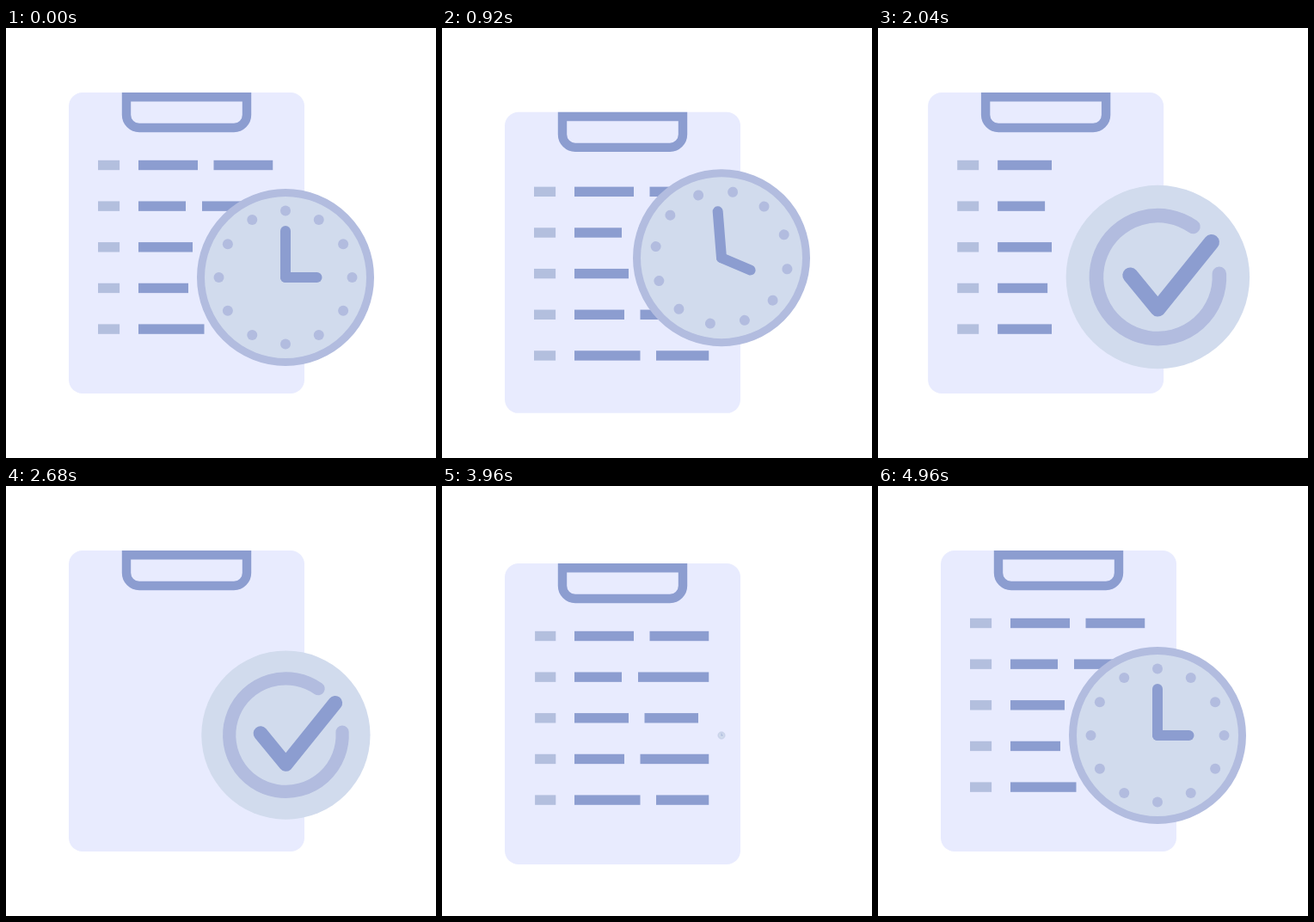
These frames come from a looping animation (500x500 px, 5 s). An HTML page:

```html
<!DOCTYPE html>
<html lang="en">
<head>
<meta charset="utf-8">
<title>Checklist and clock</title>
<style>
html, body { margin: 0; width: 100%; height: 100%; overflow: hidden; background: #fff; }
svg { display: block; width: 100%; height: 100%; }
.line { fill: none; stroke-linecap: round; stroke-linejoin: round; }
</style>
</head>
<body>
<svg viewBox="0 0 500 500">
  <defs>
    <clipPath id="textClip"><rect id="textBox" x="154" y="100" height="300"/></clipPath>
    <clipPath id="markClip"><rect id="markBox" x="107" y="100" height="300"/></clipPath>
  </defs>
  <g id="board">
    <rect x="73" y="75" width="274" height="350" rx="16" fill="#e8ebfe"/>
    <path d="M140 80.2H280V101a15 15 0 0 1-15 15H155a15 15 0 0 1-15-15Z" fill="none" stroke="#8c9dd0" stroke-width="10.4"/>
  </g>
  <g id="rows">
    <g clip-path="url(#markClip)"><g id="marks" fill="#b3bfde"/></g>
    <g clip-path="url(#textClip)"><g id="texts" fill="#8c9dd0"/></g>
  </g>
  <g id="clock">
    <circle r="98.5" fill="#d1dbed" stroke="#b2bcdf" stroke-width="9"/>
    <g id="dots" fill="#b2bcdf"/>
    <g class="line" stroke="#8c9dd0" stroke-width="12">
      <path id="minute" d="M0 0V-54"/>
      <path id="hour" d="M0 0H36.5"/>
    </g>
  </g>
  <g id="badge">
    <circle r="100" fill="#d1dbed"/>
    <path id="arc" class="line" stroke="#b2bcdf" stroke-width="15.5"/>
    <path id="check" class="line" stroke="#8c9dd0" stroke-width="17" d="M-30-2L0 34.5L58.5-38"/>
  </g>
</svg>
<script>
const FRAME = 40, LOOP = 5000;
const NS = "http://www.w3.org/2000/svg";
const $ = id => document.getElementById(id);

function add(parent, tag, attrs) {
  const el = document.createElementNS(NS, tag);
  for (const k in attrs) el.setAttribute(k, attrs[k]);
  parent.appendChild(el);
}

// x ranges of the two bars in each row
const bars = [
  [154, 223, 241.5, 310.5],
  [154, 209, 228, 310.5],
  [154, 217, 235.5, 298],
  [154, 212, 230.5, 310.5],
  [154, 230.5, 249, 310.5]
];
bars.forEach(([a, b, c, d], i) => {
  const y = 153.8 + i * 47.65, height = 11.4;
  add($("marks"), "rect", { x: 107, y, width: 25.3, height });
  add($("texts"), "rect", { x: a, y, width: b - a, height });
  add($("texts"), "rect", { x: c, y, width: d - c, height });
});
for (let i = 0; i < 12; i++) {
  const a = i * Math.PI / 6;
  add($("dots"), "circle", { cx: 77.5 * Math.cos(a), cy: 77.5 * Math.sin(a), r: 6 });
}

// cubic-bezier(.5, 0, .5, 1)
function ease(x) {
  let lo = 0, hi = 1;
  for (let i = 0; i < 24; i++) {
    const t = (lo + hi) / 2;
    if (1.5 * t * (1 - t) + t * t * t < x) lo = t; else hi = t;
  }
  return lo * lo * (3 - 2 * lo);
}

// eased value at time f through [time, value] keys
function track(f, ...keys) {
  if (f <= keys[0][0]) return keys[0][1];
  for (let i = 1; i < keys.length; i++) {
    const [t0, a] = keys[i - 1], [t1, b] = keys[i];
    if (f < t1) return a + (b - a) * ease((f - t0) / (t1 - t0));
  }
  return keys[keys.length - 1][1];
}

const move = (id, x, y, rest = "") =>
  $(id).setAttribute("transform", `translate(${x} ${y})${rest}`);
const spin = (id, a) => $(id).setAttribute("transform", `rotate(${a})`);

function arcPath(r, from, to) {
  const p = a => [r * Math.cos(a * Math.PI / 180), r * Math.sin(a * Math.PI / 180)].join(" ");
  return `M${p(from)}A${r} ${r} 0 ${to - from > 180 ? 1 : 0} 1 ${p(to)}`;
}

const CHECK = $("check").getTotalLength();

function draw(ms) {
  const f = Math.floor((ms % LOOP) / FRAME);

  const swing = track(f, [0, 0], [13, -25], [25, 25], [26, 25], [37, 0]);
  const bounce = track(f, [76, 0], [87, -15], [99, 15], [112, 0]);
  const shift = track(f, [40, 0], [50.5, -15], [57.5, 0]);
  move("board", shift, swing + bounce);
  move("rows", shift, swing * 1.35 + bounce);

  // bars are wiped away leftwards, then slide in from the right
  const wiped = f < 68;
  $("textBox").setAttribute("width", wiped ? track(f, [40, 156.5], [60, 0]) : 156.5);
  $("markBox").setAttribute("width", wiped ? track(f, [51, 25.3], [63, 0]) : 25.3);
  move("texts", wiped ? 0 : track(f, [72, 156.5], [87, 0]), 0);
  move("marks", wiped ? 0 : track(f, [84, 25.3], [102, 0]), 0);

  const size = track(f, [33.6, 1], [46, 0], [96.5, 0], [113, 1.2], [124, 1]);
  move("clock", 325, 290 - swing, ` scale(${size})`);
  spin("dots", track(f, [4, 0], [41, 360]));
  spin("hour", track(f, [7, 0], [38, 720]));
  spin("minute", track(f, [7.4, 0], [38.8, 720]));

  const grow = track(f, [29.5, 0], [47, 1]);
  const scale = track(f, [29.5, 0], [47, 1.09], [58, 1], [65, 1], [82.8, 0]);
  move("badge", 325.4, 289.6 - swing, ` rotate(${-40 * (1 - grow)}) scale(${scale})`);
  $("badge").style.display = scale > 0 ? "" : "none";
  $("clock").style.display = size > 0 ? "" : "none";
  $("arc").setAttribute("d", arcPath(67, 151 - 154 * grow, 151 + 154 * grow));
  $("check").setAttribute("stroke-dasharray", `${CHECK * grow} ${CHECK * 2}`);
}

const start = performance.now();
function tick() {
  draw(performance.now() - start);
  requestAnimationFrame(tick);
}
draw(0);
requestAnimationFrame(tick);
</script>
</body>
</html>
```
